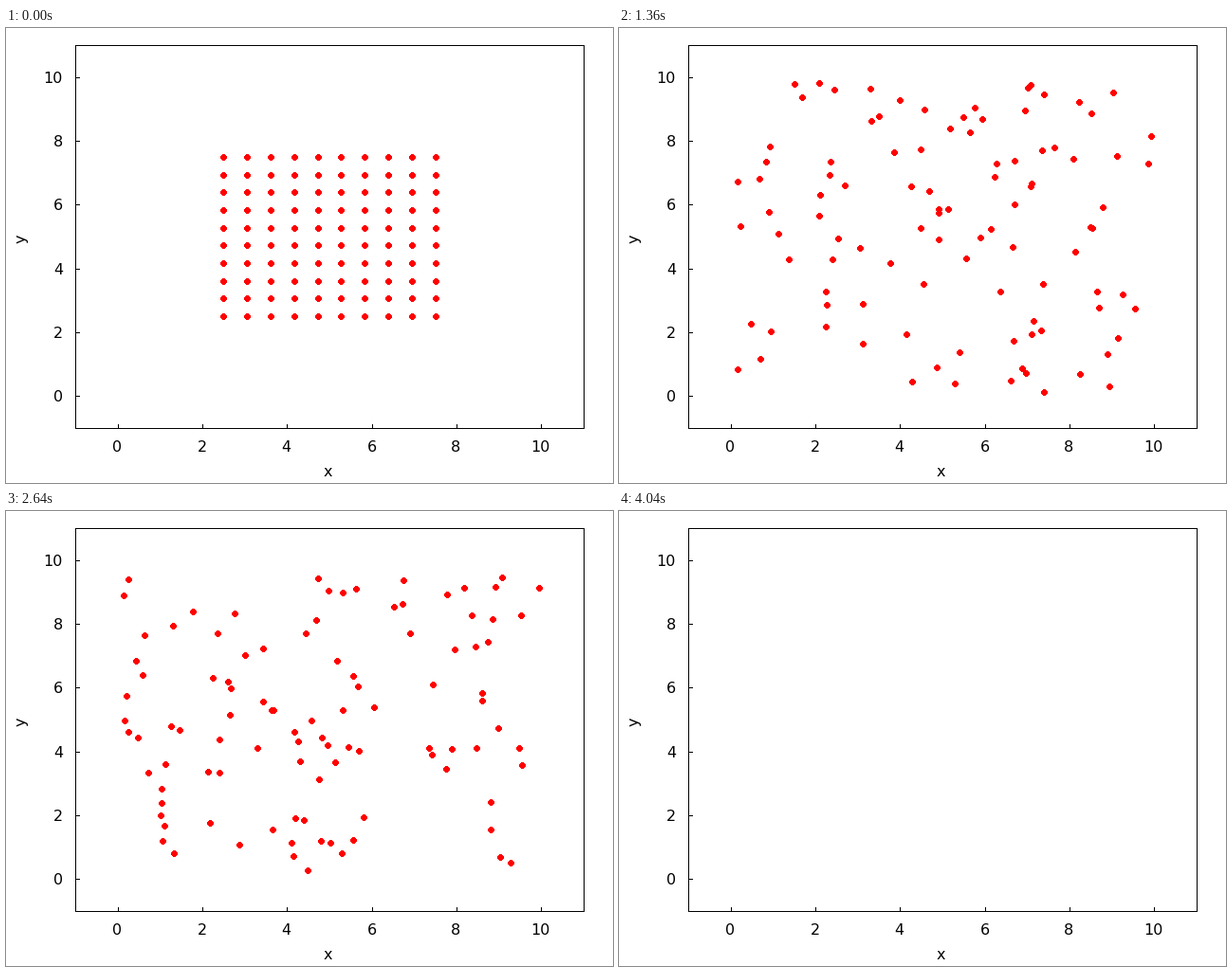
These frames come from a looping animation (640x480 px, 4.08 s). A matplotlib script:

```python
import matplotlib.pyplot as plt
import numpy as np
from matplotlib.animation import FuncAnimation
from matplotlib.collections import PolyCollection

W, H, DPI = 640, 480, 80
FRAMES, INTERVAL = 102, 40
LEFT, RIGHT, TOP, BOTTOM = 73, 609, 18, 422
LOW, HIGH = -1, 11          # axis range
BOX = 10                    # walls at 0 and BOX
SPEED = 0.2                 # spread of each velocity component per step
PX = 72 / DPI               # one pixel in points

plt.rcParams["font.family"] = "DejaVu Sans"
plt.rcParams["font.size"] = 16 * PX


def to_px(x, y):
    """Data coordinates to the nearest pixel."""
    px = LEFT + (x - LOW) * (RIGHT - LEFT) / (HIGH - LOW)
    py = BOTTOM - (y - LOW) * (BOTTOM - TOP) / (HIGH - LOW)
    return np.rint(px), np.rint(py)


def simulate(steps, seed=12):
    """Free particles released from a grid, reversing at the walls."""
    rng = np.random.default_rng(seed)
    side = np.linspace(2.5, 7.5, 10)
    pos = np.stack(np.meshgrid(side, side), axis=-1).reshape(-1, 2)
    vel = rng.normal(0, SPEED, pos.shape)
    path = [pos]
    for _ in range(steps - 1):
        ahead = pos + vel
        vel = np.where((ahead < 0) | (ahead > BOX), -vel, vel)
        pos = pos + vel
        path.append(pos)
    return path


# One quarter of a 7 px dot with stepped corners, turned four times
quarter = np.array([(1.5, -3.5), (1.5, -2.5), (2.5, -2.5), (2.5, -1.5),
                    (3.5, -1.5)])
turn = np.array([(0, 1), (-1, 0)])
DOT = np.vstack([quarter @ np.linalg.matrix_power(turn, k)
                 for k in range(4)]) + 0.5

fig = plt.figure(figsize=(W / DPI, H / DPI), dpi=DPI, facecolor="white")
ax = fig.add_axes([0, 0, 1, 1])
ax.set_xlim(0, W)
ax.set_ylim(H, 0)
ax.axis("off")


def line(xs, ys):
    """One pixel wide line through pixel centres."""
    ax.plot(np.add(xs, 0.5), np.add(ys, 0.5), color="black", lw=PX,
            antialiased=False, snap=False, zorder=3,
            solid_capstyle="projecting", solid_joinstyle="miter")


line([LEFT, RIGHT, RIGHT, LEFT, LEFT], [TOP, TOP, BOTTOM, BOTTOM, TOP])
for value in range(0, 11, 2):
    tx, ty = to_px(value, value)
    line([tx, tx], [BOTTOM - 4, BOTTOM])
    line([LEFT, LEFT + 4], [ty, ty])
    ax.text(tx - 0.5, 447, str(value), ha="center", va="baseline")
    ax.text(60, ty + 6, str(value), ha="right", va="baseline")
ax.text(339.5, 473, "x", ha="center", va="baseline")
ax.text(16.5, 222, "y", ha="center", va="center", rotation=90)

dots = PolyCollection([], facecolors="red", edgecolors="none", linewidths=0,
                      antialiaseds=False, snap=False, zorder=2)
ax.add_collection(dots, autolim=False)

path = simulate(FRAMES - 1)


def update(i):
    if i < len(path):
        centres = np.column_stack(to_px(*path[i].T))
        dots.set_verts(centres[:, None, :] + DOT)
    else:
        dots.set_verts([])
    return [dots]


anim = FuncAnimation(fig, update, frames=FRAMES, interval=INTERVAL,
                     repeat=True, repeat_delay=0)
plt.show()
```
